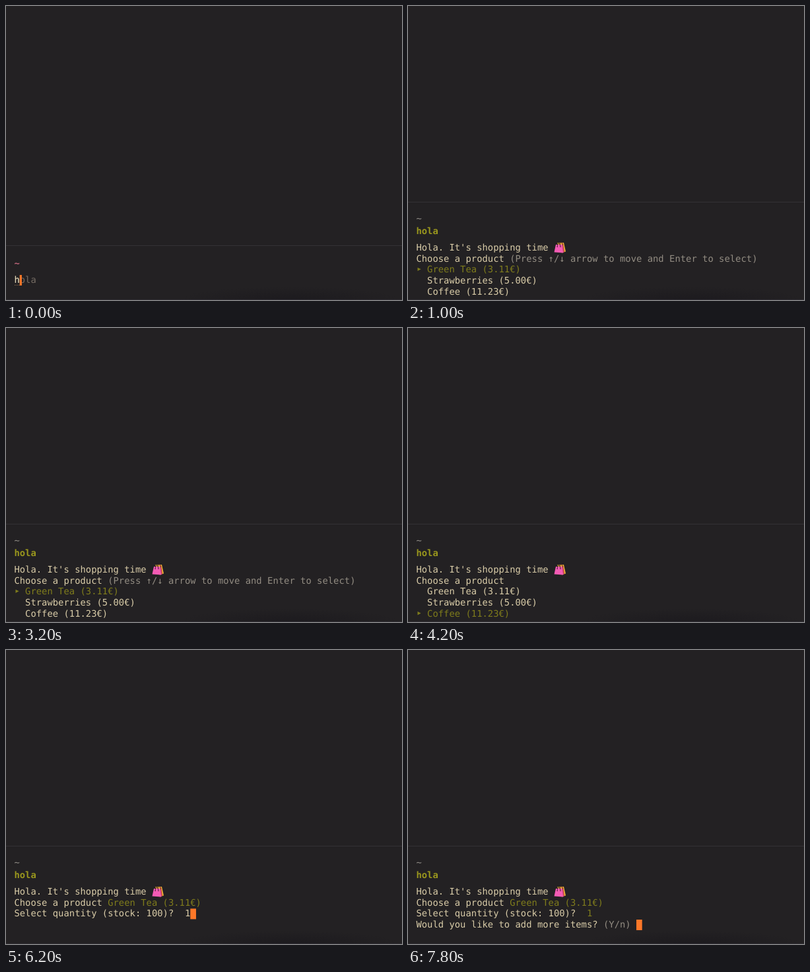
An HTML page with a canvas for the animation above (8000 ms loop, 600 by 446 pixels).

```html
<!DOCTYPE html>
<html lang="en">
<head>
<meta charset="utf-8">
<title>Terminal shop</title>
<style>
  html, body { margin: 0; width: 100%; height: 100%; overflow: hidden; background: #232123; }
  canvas { display: block; }
</style>
</head>
<body>
<canvas width="600" height="446"></canvas>
<script>
const ctx = document.querySelector('canvas').getContext('2d');
const LOOP = 8000, LEFT = 12.4, CELL = 8.34, ROW = 16.67;
const BG = '#232123', RULE = '#343235', TEXT = '#d9cca8', DIM = '#928c82',
      OLIVE = '#7f7c1c', GREEN = '#9a971d', ORANGE = '#fc7728';
const PRODUCTS = ['Green Tea (3.11€)', 'Strawberries (5.00€)', 'Coffee (11.23€)'];
const HINT = '(Press ↑/↓ arrow to move and Enter to select)';

const columnX = col => LEFT + col * CELL;
const rowY = row => 371 + row * ROW;

function rect(x, y, w, h, color) {
  ctx.fillStyle = color;
  ctx.fillRect(x, y, w, h);
}

function shape(color, ...points) {
  ctx.fillStyle = color;
  ctx.beginPath();
  points.forEach(([x, y]) => ctx.lineTo(x, y));
  ctx.fill();
}

// Every character sits in its own terminal cell, at subpixel positions.
function write(text, col, y, color, weight = 'normal') {
  ctx.font = `${weight} 13.84px "DejaVu Sans Mono", monospace`;
  ctx.textRendering = 'geometricPrecision';
  ctx.fillStyle = color;
  [...text].forEach((char, i) => ctx.fillText(char, columnX(col + i), y));
}

function blockCursor(col, row) {
  rect(columnX(col), rowY(row) - 12, 8.7, 16, ORANGE);
}

function handle(x, y, color) {
  ctx.strokeStyle = color;
  ctx.lineWidth = 1;
  ctx.beginPath();
  ctx.moveTo(x - 2.3, y + 6);
  ctx.bezierCurveTo(x - 2, y - 2, x + 2, y - 2, x + 2.5, y + 6);
  ctx.stroke();
}

function shoppingBags() {
  shape('#e9b23c', [226, 359.5], [236, 359], [239, 372.5], [233, 374.5]);
  shape('#c8442f', [233.5, 360], [235, 360], [237, 373], [235.5, 373.5]);
  handle(232, 358.5, '#6b3222');
  shape('#f35bb4', [224, 362], [233, 362], [235, 374.5], [221.5, 373.5]);
  shape('#cf3f97', [233, 362], [234.5, 363], [236, 373.5], [235, 374.5]);
  handle(228.5, 360, '#2a1420');
}

function drawInput(typed) {
  rect(0, 363, 600, 1, RULE);
  write('~', 0, 394.5, '#bd6579', 'bold');
  write('hola', 0, 420, '#756c63');
  write('hola'.slice(0, typed), 0, 420, '#e6dcba');
  if (typed < 4) {
    for (let x = 13; x < columnX(typed) - 1; x += 3) rect(x, 423, 1.5, 1, '#8d6a4b');
  }
  rect(columnX(typed), 408, 3.2, 16, ORANGE);
}

function drawHeader(top) {
  rect(0, top, 600, 1, RULE);
  write('~', 0, top + 30, '#928e88');
  write('hola', 0, top + 49, GREEN, 'bold');
}

function drawMenu(selected, showHint) {
  if (showHint) write(HINT, 17, rowY(1), DIM);
  PRODUCTS.forEach((name, i) => {
    const y = rowY(i + 2), active = i === selected;
    write(name, 2, y, active ? OLIVE : TEXT);
    if (active) shape(OLIVE, [14.5, y - 7.7], [19.6, y - 5], [14.5, y - 2.3]);
  });
}

function drawAnswers(t) {
  const confirmed = t >= 6800;
  write(PRODUCTS[0], 17, rowY(1), OLIVE);
  write('Select quantity (stock: 100)?', 0, rowY(2), TEXT);
  if (t >= 6000) write('1', 31, rowY(2), confirmed ? OLIVE : TEXT);
  if (confirmed) {
    write('Would you like to add more items?', 0, rowY(3), TEXT);
    write('(Y/n)', 34, rowY(3), DIM);
    blockCursor(40, 3);
  } else {
    blockCursor(t < 6000 ? 31 : 32, 2);
  }
}

function drawBackground() {
  rect(0, 0, 600, 446, BG);
  ctx.save();
  ctx.translate(430, 446);
  ctx.scale(1, 0.12);
  const shade = ctx.createRadialGradient(0, 0, 20, 0, 0, 170);
  shade.addColorStop(0, 'rgba(25, 23, 28, .6)');
  shade.addColorStop(1, 'rgba(25, 23, 28, 0)');
  rect(-170, -170, 340, 170, shade);
  ctx.restore();
  rect(0, 445, 600, 1, '#2d2b31');
}

function draw(t) {
  drawBackground();
  if (t < 500) return drawInput(t < 100 ? 1 : t < 200 ? 2 : t < 400 ? 3 : 4);
  if (t < 800) return drawHeader(380);
  drawHeader(297);
  write("Hola. It's shopping time", 0, rowY(0), TEXT);
  shoppingBags();
  write('Choose a product', 0, rowY(1), TEXT);
  if (t >= 5000) return drawAnswers(t);
  const presses = [3700, 4100, 4500].filter(at => t >= at).length;
  drawMenu(presses % PRODUCTS.length, presses === 0);
}

const start = performance.now();
function tick() {
  draw((performance.now() - start) % LOOP);
  requestAnimationFrame(tick);
}
tick();
</script>
</body>
</html>
```
